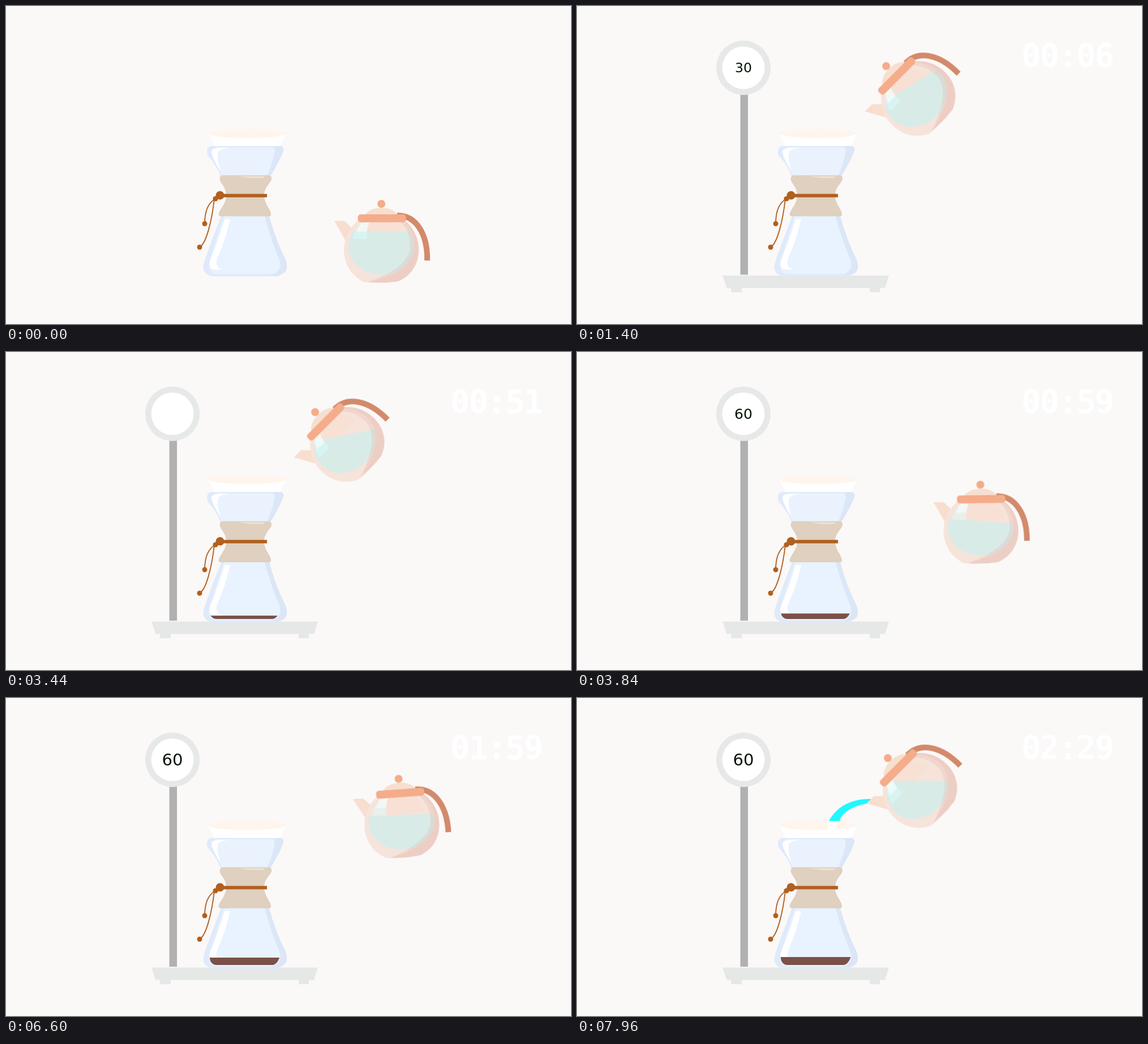
Animation of 998 by 561 pixels, one loop 8000 ms. Source, as an HTML page without scripts:

```html
<!DOCTYPE html>
<html lang="en">
<head>
<meta charset="utf-8">
<title>Pour-over brewing</title>
<style>
@property --m { syntax: "<integer>"; inherits: false; initial-value: 0; }
@property --s { syntax: "<integer>"; inherits: false; initial-value: 0; }

html, body { margin: 0; width: 100%; height: 100%; overflow: hidden; background: #fbf8f8; }
svg { position: absolute; left: 0; top: 0; width: 998px; height: 561px; }

.move { animation: 8s linear infinite; }

/* Clock */
.clock {
  position: absolute; left: 785px; top: 60px;
  font: bold 57px/1 "DejaVu Sans Mono", monospace;
  letter-spacing: -1.9px; color: #fff; white-space: nowrap;
}
.clock::before {
  animation: minutes 8s step-end infinite, seconds 8s linear infinite, start 8s step-end infinite;
  counter-reset: m var(--m) s var(--s);
  content: counter(m, decimal-leading-zero) ":" counter(s, decimal-leading-zero);
}
@keyframes start { 0% { opacity: 0; } 13.2%, 100% { opacity: 1; } }
@keyframes minutes { 0% { --m: 0; } 48.155% { --m: 1; } 82.715%, 100% { --m: 2; } }
@keyframes seconds {
  0% { --s: 0; }
  13.594% { --s: 0; animation-timing-function: steps(60); }
  48.154% { --s: 60; }
  48.155% { --s: 0; animation-timing-function: steps(60); }
  82.714% { --s: 60; }
  82.715% { --s: 0; animation-timing-function: steps(30); }
  100% { --s: 30; }
}

/* Scale */
.base { animation-name: base; transform-origin: 257px 476px; }
.foot-l { animation-name: foot-l; transform-origin: 272px 500px; }
.foot-r { animation-name: foot-r; transform-origin: 517px 500px; }
.pole { animation-name: pole; transform-origin: 295px 474px; }
.dial { animation-name: dial; transform-origin: 294px 109px; }
.thirty { animation-name: thirty; transform-origin: 294px 109px; }
.sixty { animation-name: sixty; transform-origin: 294px 109px; }
@keyframes base {
  0%, 3% { transform: scaleX(0); animation-timing-function: ease-in-out; }
  10.8%, 100% { transform: none; }
}
@keyframes foot-l { 0%, 6.8% { transform: scaleX(0); } 9%, 100% { transform: none; } }
@keyframes foot-r { 0%, 8.8% { transform: scaleX(0); } 11%, 100% { transform: none; } }
@keyframes pole {
  0%, 6% { transform: scaleY(0); }
  7% { transform: scaleY(.125); }
  10.5%, 100% { transform: none; }
}
@keyframes dial {
  0%, 9.5% { transform: scale(0); animation-timing-function: ease-out; }
  11.5%, 100% { transform: none; }
}
@keyframes thirty {
  0%, 15% { transform: scale(0); }
  17.5% { transform: scale(.81); }
  18.5%, 41% { transform: none; }
  43%, 100% { transform: scale(0); }
}
@keyframes sixty {
  0%, 45% { transform: scale(0); }
  48.5%, 100% { transform: none; }
}

/* Kettle */
.pot { animation-name: pot; transform-origin: 663px 430px; }
.water { animation-name: water; transform-origin: 663px 430px; }
@keyframes pot {
  0%, 1.5% { transform: translate(0, 0) rotate(0deg); animation-timing-function: ease-in; }
  3% { transform: translate(20px, -42px) rotate(0deg); }
  4% { transform: translate(26px, -118px) rotate(-1deg); }
  5% { transform: translate(10px, -207px) rotate(-4deg); }
  6% { transform: translate(-20px, -252px) rotate(-11deg); }
  7% { transform: translate(-50.6px, -267px) rotate(-20.5deg); }
  8% { transform: translate(-58px, -268px) rotate(-33deg); animation-timing-function: ease-out; }
  9.75%, 43% { transform: translate(-59.7px, -266.7px) rotate(-45deg); animation-timing-function: ease-in; }
  44.5% { transform: translate(-52px, -268px) rotate(-25deg); }
  46% { transform: translate(0, -235px) rotate(-6deg); }
  47.5% { transform: translate(50px, -140px) rotate(-1deg); }
  49.5% { transform: translate(52px, -42px) rotate(0deg); animation-timing-function: ease-out; }
  52%, 78.25% { transform: translate(26px, 1.5px) rotate(0deg); animation-timing-function: ease-in; }
  79.7% { transform: translate(44px, -42px) rotate(0deg); }
  81% { transform: translate(49px, -118px) rotate(-1.5deg); }
  82.5% { transform: translate(36.6px, -206px) rotate(-4deg); }
  83.5% { transform: translate(8px, -250px) rotate(-10deg); }
  84.5% { transform: translate(-38px, -266px) rotate(-19deg); }
  85.5% { transform: translate(-54px, -268px) rotate(-32deg); animation-timing-function: ease-out; }
  87%, 100% { transform: translate(-56.7px, -266.7px) rotate(-45deg); }
}
@keyframes water {
  0%, 1.5% { transform: rotate(0deg) translateY(-32px); }
  7% { transform: rotate(4.5deg) translateY(-28px); }
  9.75%, 18.75% { transform: rotate(14deg) translateY(-27.3px); }
  37.5%, 43% { transform: rotate(33deg) translateY(-17px); }
  46% { transform: rotate(8deg) translateY(-17px); }
  52%, 78.25% { transform: rotate(0deg) translateY(-16.5px); }
  82.5% { transform: rotate(2.5deg) translateY(-17.3px); }
  85% { transform: rotate(5deg) translateY(-17.3px); }
  87% { transform: rotate(31deg) translateY(-17.3px); }
  99%, 100% { transform: rotate(45deg) translateY(-17.3px); }
}
.stream { animation-name: stream; }
@keyframes stream {
  0%, 18.5% { clip-path: inset(0 0 0 100%); transform: translateX(-3px); }
  20.5%, 36% { clip-path: inset(0 0 0 0); transform: translateX(-3px); }
  38%, 39% { clip-path: inset(0 100% 0 0); transform: translateX(-3px); }
  39.01%, 92.5% { clip-path: inset(0 0 0 100%); transform: none; }
  94.5%, 100% { clip-path: inset(0 0 0 0); transform: none; }
}
.coffee { animation-name: coffee; }
@keyframes coffee {
  0%, 33.75% { transform: translateY(14px); }
  52.5%, 97% { transform: translateY(0); }
  99.5%, 100% { transform: translateY(-1px); }
}
</style>
</head>
<body>
<svg viewBox="0 0 998 561" xmlns="http://www.w3.org/2000/svg">
  <defs>
    <clipPath id="body">
      <path d="M632 487C612 477 597 457 597 430A66 66 0 0 1 729 430C729 457 714 477 692 486Q663 490 632 487Z"/>
    </clipPath>
    <clipPath id="inside"><ellipse cx="663" cy="424" rx="58.5" ry="50"/></clipPath>
    <clipPath id="flask">
      <path d="M381 371H464L486 448Q481 471 470 471H372Q359 471 359.500 452Z"/>
    </clipPath>
  </defs>

  <!-- Scale -->
  <g fill="#e6e8e7">
    <rect class="move foot-l" x="272" y="496" width="19" height="9"/>
    <rect class="move foot-r" x="517" y="496" width="18" height="9"/>
    <path class="move base" d="M257 475.500H551L544 497.500H264.500Z"/>
  </g>
  <rect class="move pole" x="288.500" y="155" width="13.500" height="319" fill="#b1b1b1"/>
  <g class="move dial">
    <circle cx="294" cy="109" r="48" fill="#e7e8e8"/>
    <circle cx="294" cy="109" r="37.500" fill="#fff"/>
  </g>
  <g fill="#061406" font-family="DejaVu Sans, sans-serif" font-size="29" text-anchor="middle">
    <text class="move thirty" x="294" y="119">30</text>
    <text class="move sixty" x="294" y="119">60</text>
  </g>

  <!-- Paper filter -->
  <path d="M358 226H494L484 248H369Z" fill="#fff"/>
  <ellipse cx="426" cy="225" rx="68" ry="8" fill="#fff5ec"/>

  <!-- Upper glass -->
  <path d="M364 247H484Q491 247 490 255Q485 270 467 300H379Q371 279 356 264Q352 247 364 247Z" fill="#dfeafc"/>
  <path d="M372 249H468Q477 250 474 259Q470 278 461 300H382Q372 280 364 264Q360 251 372 249Z" fill="#eaf2fe"/>
  <path d="M474 247H484Q491 247 490 255Q485 270 467 300H462Q474 272 475 258Z" fill="#dbe6f6"/>
  <path d="M393 250Q361 249 363 258Q367 274 379 291Q371 267 375 257Q379 252 393 250Z" fill="#fff"/>

  <!-- Lower glass -->
  <path d="M380 371H465Q475 410 494 448Q500 466 489 472L480 477H366Q346 474 349 456Q353 440 380 371Z" fill="#dfeafb"/>
  <path d="M385 371H457Q470 420 485 450Q488 472 470 473H372Q356 472 359 452Z" fill="#e9f2ff"/>
  <path d="M457 371H465Q475 410 494 448Q500 466 489 472L480 475H466Q488 470 484 450Q468 412 457 371Z" fill="#dbe6f6"/>
  <path d="M386 376H396Q387 415 373 445Q368 460 382 465H369Q357 464 360 449Q376 412 386 376Z" fill="#fff"/>
  <g clip-path="url(#flask)">
    <rect class="move coffee" x="350" y="458" width="145" height="16" fill="#7b5049"/>
  </g>

  <!-- Collar and cord -->
  <path d="M383 298.500H464Q470 299 469 306C466 314 456 320 456 334C456 349 466 356 468 366Q469 371 464 371H380Q374 371 376 365C380 355 389 348 389 334C389 320 380 315 377.500 306Q377 299 383 298.500Z" fill="#dfd0bf"/>
  <path d="M411 300.500H456V303Q430 305 411 300.500Z" fill="#ebe3d9"/>
  <g fill="#b0601f">
    <rect x="378" y="331.500" width="83" height="6"/>
    <circle cx="378" cy="334" r="7.500"/>
    <circle cx="370" cy="340" r="4.600"/>
    <circle cx="351" cy="384" r="4.500"/>
    <circle cx="342" cy="425.500" r="4.500"/>
    <path d="M370 340C357 347 351 362 351 384M368 340C364 376 354 420 342 425" fill="none" stroke="#b0601f" stroke-width="1.900"/>
  </g>

  <!-- Poured water -->
  <g class="move stream">
    <path d="M445 217H464C468 201 488 189 520 185V178C485 177 458 192 445 217Z" fill="#1ff8ff"/>
    <path d="M445 217H459L456 236H442Z" fill="#fff"/>
  </g>

  <!-- Kettle -->
  <g class="move pot">
    <path d="M580 379H598L613 394L603 420Z" fill="#f7decf"/>
    <g clip-path="url(#body)">
      <rect x="590" y="360" width="145" height="130" fill="#f6e3da"/>
      <path d="M642 380H686Q700 392 704 410H634Q634 392 642 380Z" fill="#f8e0d5"/>
      <g clip-path="url(#inside)">
        <rect class="move water" x="543" y="430" width="240" height="140" fill="#d9ebe7"/>
      </g>
      <path d="M690 374Q716 396 714 428Q708 464 638 487L740 492V372Z" fill="#e0b3aa" opacity=".28"/>
      <path d="M698 374Q723 398 721.500 428Q714 472 638 487L740 492V372Z" fill="#e0b3aa" opacity=".22"/>
      <path d="M627 382H642Q637 394 637 411H612Q614 396 627 382Z" fill="#d8ffff" opacity=".45"/>
      <path d="M628 382H642Q638 390 637 398H619Z" fill="#fff" opacity=".5"/>
    </g>
    <path d="M634 369Q642 356 663 356Q684 356 692 369Z" fill="#f7dfcf"/>
    <path d="M691 369.500C724 369 745 402 744 449" fill="none" stroke="#d28a6b" stroke-width="10"/>
    <rect x="621.500" y="367.500" width="85" height="14" rx="5" fill="#f4ac8a"/>
    <circle cx="663" cy="349" r="7" fill="#f4ac8a"/>
  </g>
</svg>
<div class="clock"></div>
</body>
</html>
```
